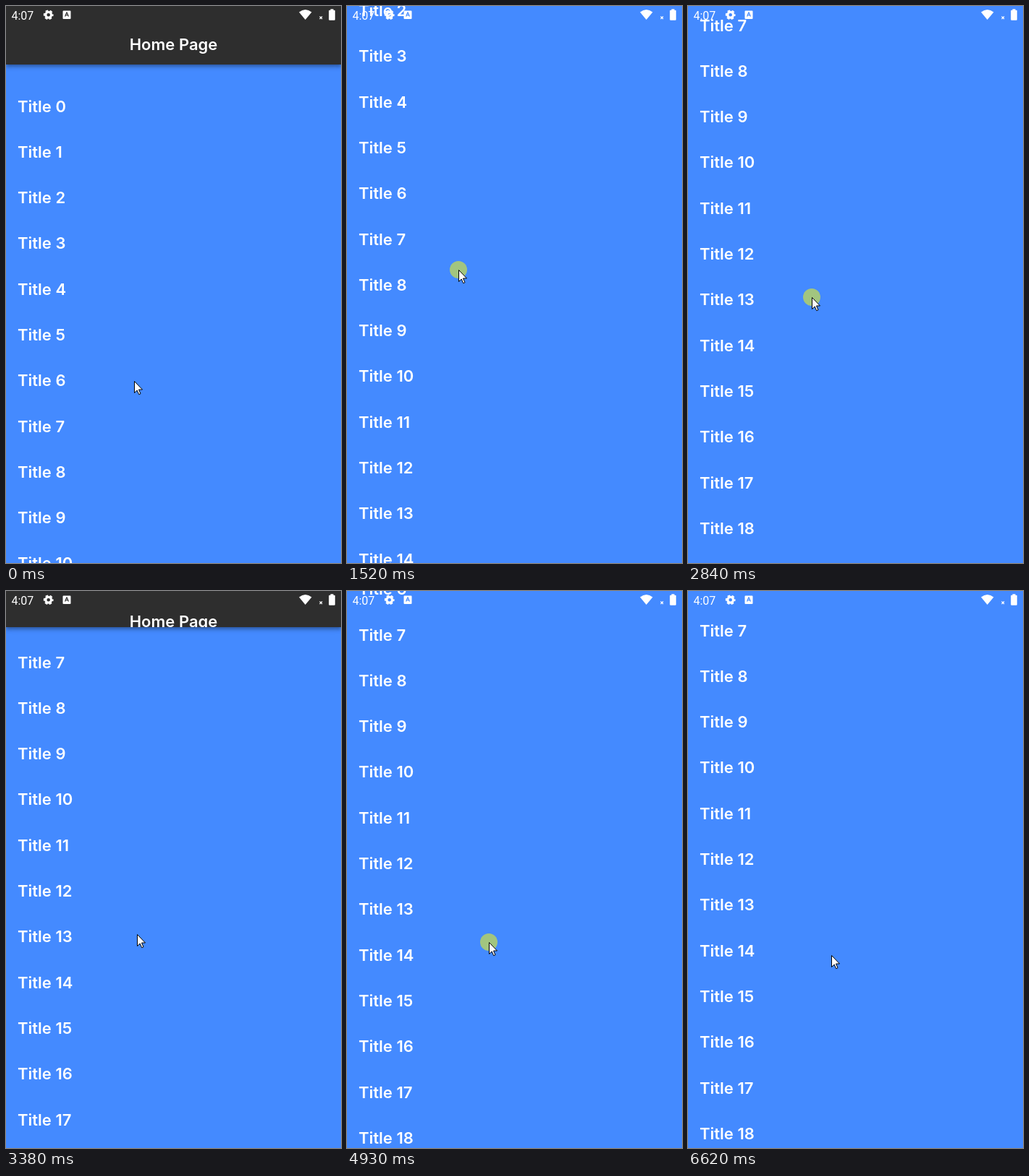
An HTML page for the animation above (6700 ms loop, 463x771 px).

```html
<!DOCTYPE html>
<html lang="en">
<head>
<meta charset="utf-8">
<title>Home Page</title>
<style>
  html, body { margin: 0; width: 100%; height: 100%; overflow: hidden; background: #448aff; }
  body { position: relative; color: #fff; font: 600 22px Inter, sans-serif; }
  #list { position: absolute; left: 16px; top: 107.5px; line-height: 63.3px; }
  #bar {
    position: absolute; left: 0; top: 0; width: 463px; overflow: hidden; background: #2e2e2e;
    box-shadow: 0 2px 4px rgba(0,0,0,.2), 0 4px 5px rgba(0,0,0,.14), 0 1px 10px rgba(0,0,0,.12);
  }
  #title { position: absolute; width: 100%; text-align: center; line-height: 36px; }
  svg { position: absolute; left: 0; top: 0; }
</style>
</head>
<body>
<div id="list"></div>
<div id="bar"><div id="title">Home Page</div></div>
<svg width="463" height="771" fill="#fff">
  <!-- status bar -->
  <text x="7.5" y="18.5" style="font: 400 16px Roboto, sans-serif">4:07</text>
  <g fill="none" stroke="#fff" transform="translate(58.7 12.3)">
    <circle r="3.9" stroke-width="3.2"/>
    <circle r="5.6" stroke-width="2.6" stroke-dasharray="3.4 2.464" stroke-dashoffset="1.7"/>
  </g>
  <path fill-rule="evenodd" d="M79.5 6.5h9q1 0 1 1v9.500q0 1-1 1h-9q-1 0-1-1v-9.500q0-1 1-1z
    M83.300 8.500L81 14.500H82.300L82.800 13.200H85.200L85.700 14.500H87L84.700 8.500zM84 10L84.800 12.200H83.200z"/>
  <path d="M405 8.5Q413.7 1.5 422.5 8.5L413.7 19z"/>
  <path d="M433.5 14.5l3.5 3.5m0-3.5l-3.5 3.5" stroke="#fff" stroke-width="1.2"/>
  <path d="M448.5 4.3h4v1.5h1.3q1 0 1 1v12q0 1-1 1h-6.6q-1 0-1-1v-12q0-1 1-1h1.3z"/>
  <!-- pointer -->
  <g id="pointer">
    <circle id="touch" r="12" fill="#ff0" fill-opacity=".5"/>
    <path d="M.5 .5V16.5L4.2 13L6.7 18.7L9 17.7L6.5 12H11.5z" stroke="#000"/>
  </g>
</svg>
<script>
const LOOP = 6700, BAR = 81, SNAP = 250, FLING = 259;
const $ = id => document.getElementById(id);
const clamp = u => Math.min(1, Math.max(0, u));
const smooth = u => (u = clamp(u), u * u * (3 - 2 * u));
const mix = (a, b, u) => a.map((v, i) => v + (b[i] - v) * u);

const swipe = (start, end, from, to) => ({
  start, end, from, to,
  progress: t => clamp((t - start) / (end - start)) ** 2
});
const home = [177, 519];
const swipes = [
  swipe(520, 1600, [194, 624], [147, 322]),
  swipe(2690, 3237, [170, 397], [181, 475]),
  swipe(4050, 4197, [190, 558], [190, 515]),
  swipe(4760, 5387, [196, 481], [202, 551]),
  swipe(6160, 6350, [204, 575], [198, 504])
];

// Between swipes the pointer rests for half the pause, then glides to the next start.
function pointerAt(t) {
  const i = swipes.findIndex(s => t < s.end);
  if (i < 0) return swipes.at(-1).to;
  const next = swipes[i], last = swipes[i - 1] || { end: 0, to: home };
  if (t >= next.start) return mix(next.from, next.to, next.progress(t));
  return mix(last.to, next.from, smooth(2 * (t - last.end) / (next.start - last.end) - 1));
}

// Each swipe drags the list with it; the first one ends in a fling.
function scrollAt(t) {
  const fling = FLING * (1 - Math.exp(-Math.max(0, t - swipes[0].end) / 116));
  return swipes.reduce((sum, s) => sum + (s.from[1] - s.to[1]) * s.progress(t), fling);
}

// The bar scrolls away at first; later it snaps open or shut when a swipe is released.
function barAt(t) {
  const open = swipes.slice(1).reduce((sum, s) =>
    sum + Math.sign(s.to[1] - s.from[1]) * smooth((t - s.end) / SNAP), 0);
  return Math.max(BAR - scrollAt(t), BAR * open);
}

function draw(t) {
  const bar = Math.round(barAt(t));
  const [x, y] = pointerAt(t).map(Math.round);
  $("list").style.transform = `translateY(${-Math.round(scrollAt(t))}px)`;
  $("bar").style.height = bar + "px";
  $("bar").style.display = bar > 0 ? "block" : "none";
  $("title").style.top = Math.max(24, (bar - 12) / 2) + "px";
  $("pointer").setAttribute("transform", `translate(${x} ${y})`);
  $("touch").style.display = swipes.some(s => t > s.start - 80 && t < s.end) ? "" : "none";
}

for (let i = 0; i < 24; i++) {
  const row = document.createElement("div");
  row.textContent = "Title " + i;
  $("list").append(row);
}

const begin = performance.now();
function tick() {
  draw((performance.now() - begin) % LOOP);
  requestAnimationFrame(tick);
}
tick();
</script>
</body>
</html>
```
